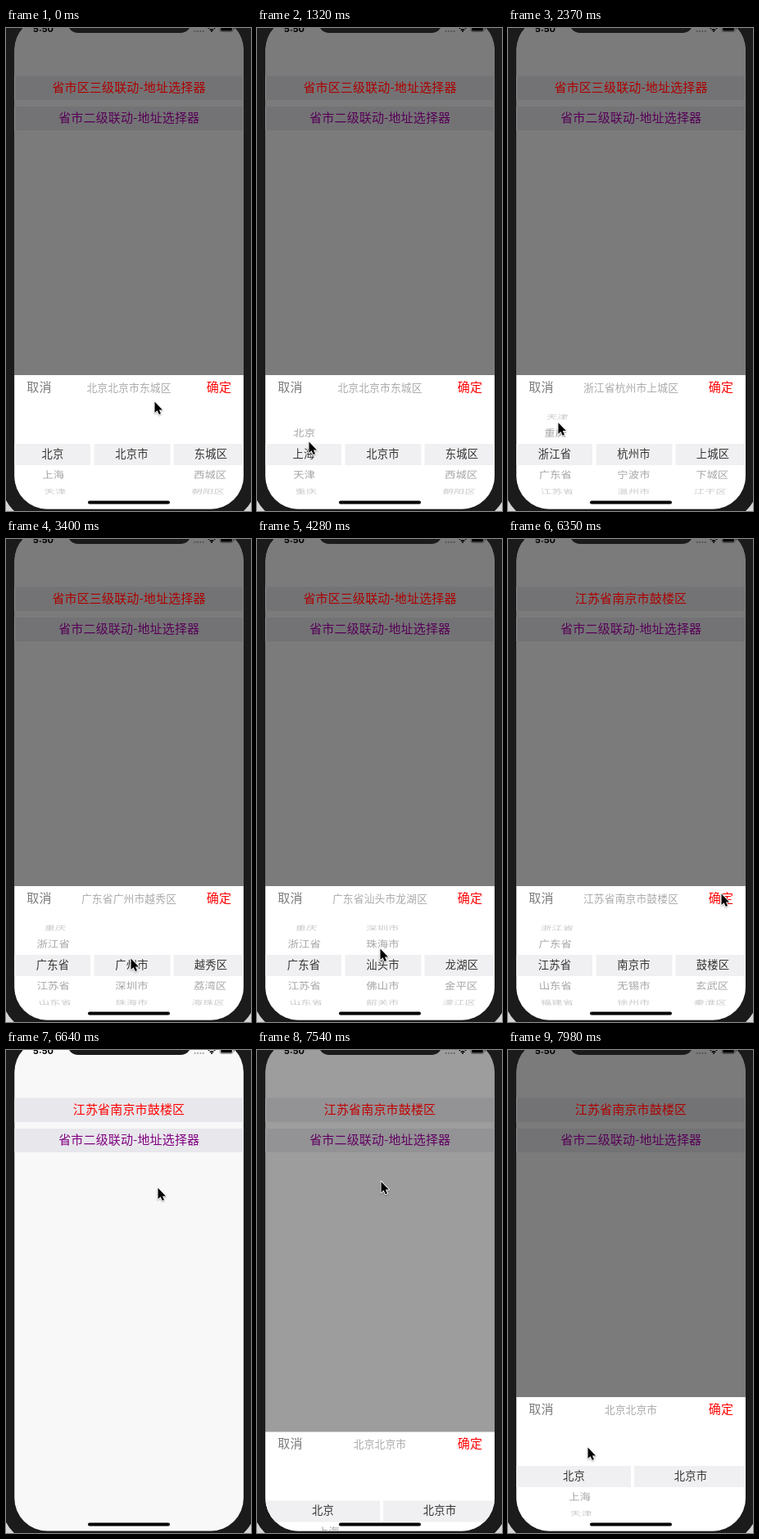
Write an HTML page with a canvas that moves like this. It is 299 px wide and 590 px high and loops after 8 s.

```html
<!DOCTYPE html>
<html lang="zh-CN">
<head>
<meta charset="utf-8">
<style>
html, body { margin: 0; width: 100%; height: 100%; overflow: hidden; background: #1b1b1b; }
canvas { display: block; width: 299px; height: 590px; }
</style>
</head>
<body>
<canvas id="stage"></canvas>
<script>
const W = 299, H = 590, LOOP = 8000, STEP = 147.9;
const canvas = document.getElementById('stage');
const ctx = canvas.getContext('2d');
const ratio = window.devicePixelRatio || 1;
canvas.width = W * ratio;
canvas.height = H * ratio;

const CJK = '"Noto Sans CJK SC", "Noto Sans CJK", "Noto Sans CJK JP", sans-serif';
const BODY = '#1b1b1b';
const WHEEL_R = 56.4, ROW_ANGLE = 0.47;

const list = names => names.split(' ');
const provinces = list('北京 上海 天津 重庆 浙江省 广东省 江苏省 山东省 福建省 湖南省');
const guangdong = list('广州市 深圳市 珠海市 汕头市 佛山市 韶关市');
// Each region is valid from its step on.
const regions = [
  { from: 0, title: '北京北京市东城区', cities: ['北京市'], areas: list('东城区 西城区 朝阳区') },
  { from: 15, title: '浙江省杭州市上城区', cities: list('杭州市 宁波市 温州市'), areas: list('上城区 下城区 江干区') },
  { from: 20, title: '广东省广州市越秀区', cities: guangdong, areas: list('越秀区 荔湾区 海珠区') },
  { from: 29, title: '广东省汕头市龙湖区', cities: guangdong, areas: list('龙湖区 金平区 濠江区') },
  { from: 35, title: '江苏省南京市鼓楼区', cities: list('南京市 无锡市 徐州市 常州市 苏州市 南通市'), areas: list('鼓楼区 玄武区 秦淮区') }
];

// Pointer stops: step, x, y
const stops = [
  [0, 181, 456], [6, 65, 535], [9, 63, 505], [20, 60, 500], [23, 152, 512], [29, 150, 500],
  [32, 54, 520], [35, 52, 493], [37, 52, 493], [42, 260, 433], [43, 260, 433],
  [45, 185, 168], [47, 174, 104], [50, 161, 100], [54, 97, 485]
];

function ramp(k, a, b) {
  const u = Math.min(1, Math.max(0, (k - a) / (b - a)));
  return u * u * (3 - 2 * u);
}

const provincePos = k => ramp(k, 6, 9) + 3 * ramp(k, 9, 14) + ramp(k, 17, 19) + ramp(k, 32, 34);
// After a new province the city wheel runs back to its first row.
const cityPos = k => k < 35 ? 3 * ramp(k, 24, 29) : 3 * 0.64 ** ((k - 35) ** 2);
const sheetShown = k => 1 - ramp(k, 43, 45) + ramp(k, 49, 52);

// Up and down strokes while a wheel is dragged
function stroke(k, a, b) {
  return k > a && k < b ? -20 * Math.sin((k - a) / (b - a) * Math.PI * 4) : 0;
}

function pointer(k) {
  let [, x, y] = stops[0];
  for (let i = 1; i < stops.length; i++) {
    const u = ramp(k, stops[i - 1][0], stops[i][0]);
    x += (stops[i][1] - x) * u;
    y += (stops[i][2] - y) * u;
  }
  return [x, y + stroke(k, 9, 20) + stroke(k, 23, 29)];
}

function box(x, y, w, h, color, r = 0) {
  ctx.fillStyle = color;
  ctx.beginPath();
  ctx.roundRect(x, y, w, h, r);
  ctx.fill();
}

function text(str, x, y, size, color) {
  ctx.font = `${size}px ${CJK}`;
  ctx.letterSpacing = '0.15px';
  ctx.textAlign = 'center';
  ctx.fillStyle = color;
  ctx.fillText(str, x, y + size * 0.33);
}

function wheel(items, pos, left, width, cx, nudge = 0) {
  const depth = 0.08 * (150 - cx);
  const slip = WHEEL_R * Math.sin((Math.round(pos) - pos) * ROW_ANGLE);
  box(left, 508 + slip, width, 26, '#f0f0f2');
  items.forEach((name, i) => {
    const away = Math.abs(i - pos), a = (i - pos) * ROW_ANGLE;
    if (Math.abs(a) > 1.3) return;
    const g = Math.round(130 + 35 * away);
    const x = cx + depth * (1 - Math.cos(a)) + nudge * Math.min(1, away);
    ctx.save();
    ctx.transform(1, 0, depth * Math.sin(a) / WHEEL_R, Math.cos(a), x, 520.5 + WHEEL_R * Math.sin(a));
    text(name, 0, 0, 13.3, away < 0.5 ? '#333' : `rgb(${g},${g},${g})`);
    ctx.restore();
  });
}

function statusBar() {
  ctx.font = 'bold 11px Inter, Arial, sans-serif';
  ctx.letterSpacing = '0px';
  ctx.textAlign = 'center';
  ctx.fillStyle = '#000';
  ctx.fillText('5:50', 45.5, 5);
  for (let i = 0; i < 4; i++) box(229.5 + i * 3.4, 2.8, 2.2, 2.2, '#aaa', 1.1);
  ctx.strokeStyle = '#000';
  ctx.lineWidth = 1.5;
  for (const r of [3.2, 6]) {
    ctx.beginPath();
    ctx.arc(251, 5, r, -Math.PI * 0.75, -Math.PI * 0.25);
    ctx.stroke();
  }
  box(250, 3, 2, 2, '#000', 1);
  ctx.lineWidth = 0.7;
  ctx.strokeStyle = '#777';
  ctx.beginPath();
  ctx.roundRect(261, -4, 16, 8.5, 2);
  ctx.stroke();
  box(262.2, -3, 13.6, 6.5, '#000', 1.2);
  box(278, -1, 1.1, 3, '#777', 0.5);
}

function page(k, shown) {
  box(10, 0, 280, H, '#f8f8f8');
  statusBar();
  box(10, 58.5, 280, 29.5, '#e8e7ec');
  box(10, 96, 280, 29, '#e8e7ec');
  box(10, 0, 280, H, `rgba(0,0,0,${0.5 * shown})`);
  const first = k < 42 ? '省市区三级联动-地址选择器' : '江苏省南京市鼓楼区';
  text(first, 150, 73, 15, `hsl(0,100%,${50 - 16 * shown}%)`);
  text('省市二级联动-地址选择器', 150.2, 110.5, 15, `hsl(300,100%,${25 - 8 * shown}%)`);
}

function sheet(k, shown) {
  if (!shown) return;
  ctx.save();
  ctx.translate(0, 164 * (1 - shown));
  box(10, 424, 280, 166, '#fff');
  text('取消', 40.5, 439, 15, '#7b7b7b');
  text('确定', 260, 439, 15, '#f00');
  const two = k > 47;
  const region = regions.filter(r => r.from <= k).pop();
  text(two ? '北京北京市' : region.title, 150, 439.5, 12.75, '#aaa');
  if (two) {
    wheel(provinces, 0, 10, 140, 80.5, 6.5);
    wheel(['北京市'], 0, 154, 140, 223);
  } else {
    wheel(provinces, provincePos(k), 10, 93, 57);
    wheel(region.cities, cityPos(k), 107.5, 93, 153.5);
    wheel(region.areas, 0, 204.5, 93, 250);
  }
  ctx.restore();
}

function arrow(x, y) {
  ctx.save();
  ctx.translate(x, y);
  ctx.beginPath();
  [[0.5, 0.5], [0.5, 14], [3.6, 11.2], [5.8, 16], [8, 15], [5.9, 10.4], [10, 10.4]]
    .forEach(p => ctx.lineTo(...p));
  ctx.closePath();
  ctx.shadowColor = 'rgba(0,0,0,.3)';
  ctx.shadowBlur = 2 * ratio;
  ctx.shadowOffsetY = ratio;
  ctx.lineWidth = 1.8;
  ctx.lineJoin = 'round';
  ctx.strokeStyle = '#fff';
  ctx.stroke();
  ctx.shadowColor = 'transparent';
  ctx.fillStyle = '#000';
  ctx.fill();
  ctx.restore();
}

function draw(time) {
  const k = Math.floor((time % LOOP + 16) / STEP);
  const shown = sheetShown(k);
  ctx.setTransform(ratio, 0, 0, ratio, 0, 0);
  box(0, 0, W, H, '#d6d6d6');
  box(-5, -60, 310, 662, BODY, 46);
  ctx.save();
  ctx.beginPath();
  ctx.roundRect(10.3, -13, 279.6, 600.5, 40);
  ctx.clip();
  page(k, shown);
  sheet(k, shown);
  ctx.restore();
  box(75, -30, 151, 36, BODY, 13);
  box(100, 577.6, 100, 3.8, '#000', 1.9);
  arrow(...pointer(k));
}

const start = performance.now();
function tick() {
  draw(performance.now() - start);
  requestAnimationFrame(tick);
}
tick();
</script>
</body>
</html>
```
